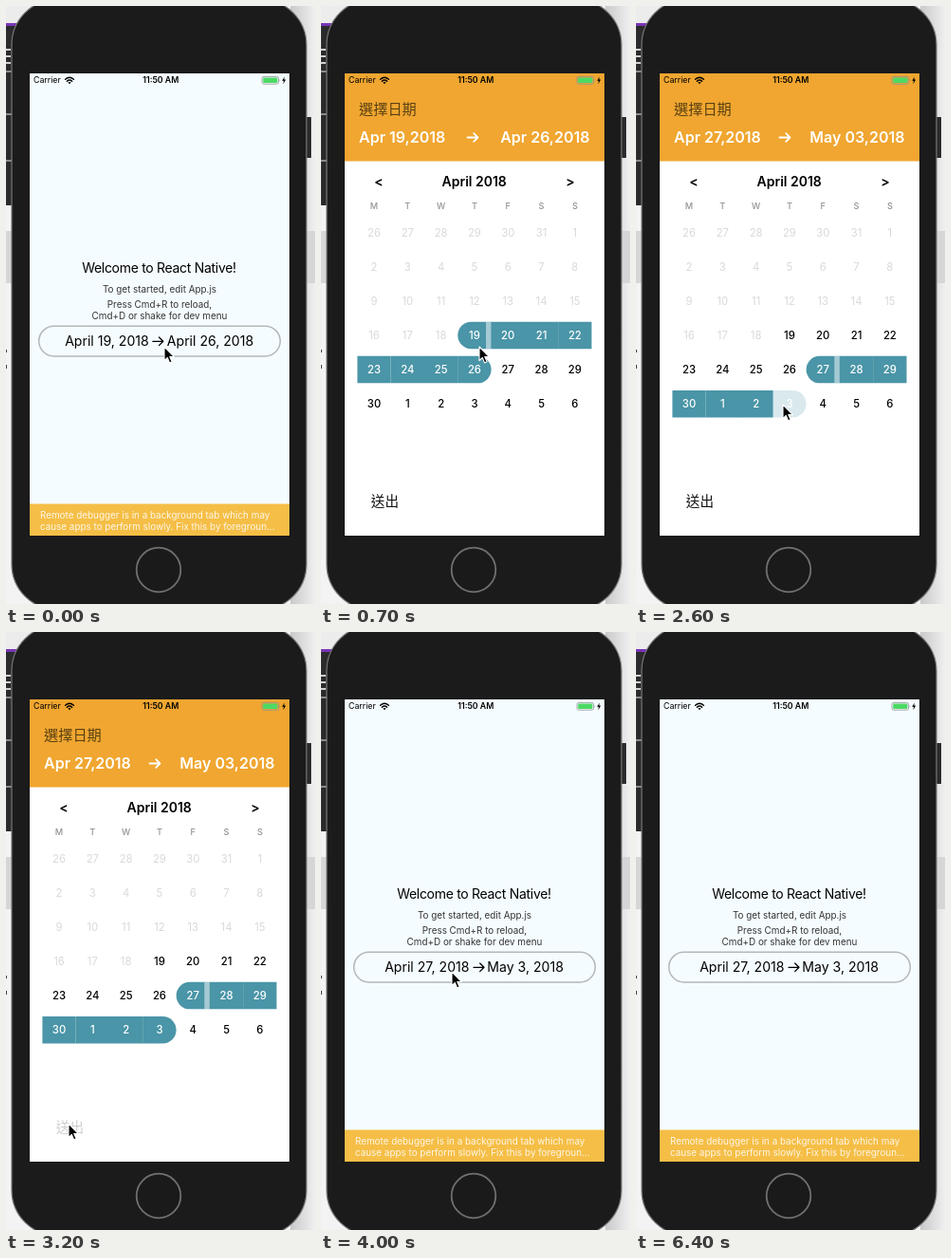
Recreate the animation shown at these times as an HTML page. Size 326 by 630 pixels, loop 6.9 s.

```html
<!DOCTYPE html>
<html lang="en">
<head>
<meta charset="utf-8">
<title>Date range picker</title>
<style>
html, body { margin: 0; width: 100%; height: 100%; overflow: hidden; background: #fff; }
svg { display: block; width: 326px; height: 630px; font-family: Inter, Roboto, sans-serif; }
.mid { text-anchor: middle; }
.end { text-anchor: end; }
.status { font-size: 8.8px; }
.note { font-size: 9.9px; fill: #333; }
.warn { font-size: 9.9px; fill: #fff; fill-opacity: .88; }
.range { font-size: 14.1px; }
.head { font-size: 16px; font-weight: 600; fill: #fff; }
.month { font-size: 14px; font-weight: 600; }
.week { font-size: 9.2px; font-weight: 500; fill: #929292; }
.day { font-size: 11.3px; font-weight: 500; }
.past { font-weight: 400; fill: #d9d9d9; }
.on { fill: #fff; }
.cjk { font-family: "Noto Sans CJK TC", "Noto Sans CJK", sans-serif; }
.line { fill: none; stroke-linecap: round; stroke-linejoin: round; }
</style>
</head>
<body>
<svg viewBox="0 0 326 630">
  <defs>
    <clipPath id="screen"><rect x="25" y="71" width="274" height="487"/></clipPath>
    <linearGradient id="shade">
      <stop offset="0" stop-color="#c9c9c9"/>
      <stop offset="1" stop-color="#efefef"/>
    </linearGradient>
    <path id="arrow" d="M-5.5 0H5.5M1.2 -4.3L5.5 0L1.2 4.3"/>
  </defs>

  <!-- desktop behind the phone -->
  <rect width="326" height="630" fill="#f3f3f3"/>
  <rect x="300" width="26" height="630" fill="url(#shade)"/>
  <rect y="237" width="326" height="55" fill="#d6d6d6"/>
  <rect width="40" height="18" fill="#ececec"/>
  <rect y="20" width="14" height="190" fill="#2b2b2d"/>
  <rect y="18" width="14" height="3" fill="#7a35b8"/>
  <path d="M0 46H5M0 53H5M0 60H5" stroke="#d0d0d0" stroke-width="2"/>
  <path d="M0 69H7M0 114H7M0 163H7" stroke="#8b8b8b" stroke-width="2"/>
  <path d="M0 362V365M0 378V382" stroke="#444" stroke-width="2"/>

  <!-- phone -->
  <path d="M2 77H7V108H2ZM1 117H7V160H1ZM1 167H7V210H1ZM316 117H322V160H316Z" fill="#2a2a2b"/>
  <rect x="6" y="-7" width="311" height="643" rx="48" fill="#1b1b1b" stroke="#777" stroke-width="1.2"/>
  <circle cx="161" cy="594" r="23.3" fill="#1a1a1a" stroke="#707070" stroke-width="1.8"/>

  <g clip-path="url(#screen)">
    <rect x="25" y="71" width="274" height="487" fill="#f5fcff"/>
    <text class="mid" x="161.5" y="281" font-size="14" letter-spacing="-.3">Welcome to React Native!</text>
    <g class="note mid">
      <text x="162" y="301.8">To get started, edit App.js</text>
      <text x="162" y="317.8">Press Cmd+R to reload,</text>
      <text x="162" y="330.3">Cmd+D or shake for dev menu</text>
    </g>
    <rect x="34.7" y="337.2" width="254.6" height="31.8" rx="15.9" fill="none" stroke="#b3b8ba" stroke-width="1.5"/>
    <g class="range">
      <text id="from" class="end" y="358.2"></text>
      <text id="to" y="358.2"></text>
      <use id="rangeArrow" href="#arrow" class="line" stroke="#000" stroke-width="1.3"/>
    </g>
    <rect x="25" y="524.5" width="274" height="34" fill="#f5be46"/>
    <g class="warn">
      <text x="36" y="539.5">Remote debugger is in a background tab which may</text>
      <text x="36" y="552">cause apps to perform slowly. Fix this by foregroun...</text>
    </g>

    <g id="sheet">
      <rect x="25" y="71" width="274" height="487" fill="#fff"/>
      <rect x="25" y="71" width="274" height="92.5" fill="#f0a630"/>
      <text class="cjk" lang="zh-Hant" x="40" y="114.2" font-size="15.2" font-weight="500" fill="#5a4112">選擇日期</text>
      <g class="head">
        <text id="start" x="40" y="144.2"></text>
        <text id="end" class="end" x="283.5" y="144.2"></text>
        <use id="headArrow" href="#arrow" class="line" stroke="#fff" stroke-width="1.8"/>
      </g>
      <g class="month mid">
        <text x="61" y="190">&lt;</text>
        <text x="161.7" y="190">April 2018</text>
        <text x="263" y="190">&gt;</text>
      </g>
      <g id="week" class="week mid"></g>
      <g id="days" class="day mid"></g>
      <text id="submit" class="cjk" lang="zh-Hant" x="52.8" y="527" font-size="14.6" fill="#111">送出</text>
    </g>

    <g class="status">
      <text x="29" y="81.3">Carrier</text>
      <text class="mid" x="163.3" y="81.3" font-weight="600">11:50 AM</text>
      <g class="line" stroke="#000" stroke-width="1.5" stroke-linecap="butt">
        <path d="M62.6 77.2Q67 73.2 71.4 77.2M64.4 79.2Q67 76.9 69.6 79.2"/>
      </g>
      <path d="M65.4 80.6Q67 79.2 68.6 80.6L67 82.3Z"/>
      <rect x="270" y="74.4" width="17.6" height="7.8" rx="2" fill="none" stroke="#8d9295" stroke-width=".8"/>
      <rect x="271.2" y="75.6" width="15.2" height="5.4" rx="1" fill="#4cd964"/>
      <path d="M288.6 76.8Q290 78.3 288.6 79.8Z" fill="#8d9295"/>
      <path d="M293.9 74.4L291.2 78.8H293L292.4 82.2L295.2 77.6H293.3Z"/>
    </g>
  </g>

  <path id="cursor" d="M0 0V14.6L3.3 11.5L5.6 16.9L8.1 15.8L5.8 10.5H10.4Z" stroke="#fff" stroke-width="1.1" stroke-linejoin="round"/>
</svg>
<script>
const LOOP = 6900, STEP = 100, HEIGHT = 487;
const LEFT = 38.4, TOP = 238.5, COL = 35.3, ROW = 36.15, CELL = 28.5;
const TEAL = '#4a95a7';
const APR19 = 24, APR26 = 31, APR27 = 32, MAY3 = 38;
const $ = id => document.getElementById(id);

// time, x, y of the pointer tip
const path = [
  [0, 167, 359], [800, 167, 359], [1200, 197, 379], [1800, 197, 379],
  [2300, 155, 420], [2600, 155, 420], [3000, 66, 518], [3600, 66, 518],
  [4000, 138, 358], [6100, 138, 358], [6300, 219, 185], [LOOP, 219, 185]
];

function pointer(t) {
  const i = path.findIndex(p => p[0] > t);
  const [t0, x0, y0] = path[i - 1], [t1, x1, y1] = path[i];
  const u = (t - t0) / (t1 - t0), k = u * u * (3 - 2 * u);
  return [x0 + (x1 - x0) * k, y0 + (y1 - y0) * k];
}

function sheetOffset(t) {
  if (t < 200 || t > 3700) return HEIGHT;
  if (t < 3300) return t > 600 ? 0 : HEIGHT * .62 * .31 ** ((t - 200) / 100);
  return HEIGHT * (1 - .304 ** ((t - 3300) / 100));
}

// a touched item dims, then fades back after release
function touch(t, down, up) {
  if (t < down || t > up + 200) return 1;
  return t <= up ? .2 : Math.min(1, .2 + (t - up) / 250);
}

function block(x, y, first, last, col) {
  const r = CELL / 2, w = COL + (last || col === 6 ? 0 : .3);
  const round = s => `A${r} ${r} 0 0 ${s} `;
  if (first) return `M${x + w} ${y}H${x + r}${round(0)}${x + r} ${y + CELL}H${x + w}Z`;
  if (last) return `M${x} ${y}H${x + w - r}${round(1)}${x + w - r} ${y + CELL}H${x}Z`;
  return `M${x} ${y}h${w}v${CELL}h${-w}Z`;
}

function dayCell(i, from, to, alpha) {
  const col = i % 7, x = LEFT + col * COL, cy = TOP + Math.floor(i / 7) * ROW, y = cy - CELL / 2;
  const num = i < 6 ? 26 + i : i < 36 ? i - 5 : i - 35;
  const on = i >= from && i <= to;
  let out = `<g opacity="${alpha}">`;
  if (on) {
    out += `<path fill="${TEAL}" d="${block(x, y, i === from, i === to, col)}"/>`;
    if (i === from && to > from) out += `<rect x="${x + COL - 5.6}" y="${y}" width="5.6" height="${CELL}" fill="#fff" opacity=".5"/>`;
    if (col === 0) out += `<rect x="${x + COL - .6}" y="${y}" width=".8" height="${CELL}" fill="#fff" opacity=".45"/>`;
  }
  const kind = on ? 'on' : i < APR19 ? 'past' : '';
  return out + `<text class="${kind}" x="${x + COL / 2}" y="${cy + 4.1}">${num}</text></g>`;
}

let lastDays = '';
function drawDays(t) {
  const from = t < 1700 ? APR19 : APR27;
  const to = t < 1700 ? APR26 : t < 2600 ? APR27 : MAY3;
  let out = '';
  for (let i = 0; i < 42; i++) {
    const alpha = i === APR27 ? touch(t, 1600, 1700) : i === MAY3 ? touch(t, 2500, 2600) : 1;
    out += dayCell(i, from, to, alpha);
  }
  if (out !== lastDays) $('days').innerHTML = lastDays = out;
}

const move = (id, x, y) => $(id).setAttribute('transform', `translate(${x} ${y})`);

function draw(t) {
  const chosen = t >= 3300, ended = t >= 2600;
  $('from').textContent = chosen ? 'April 27, 2018' : 'April 19, 2018';
  $('to').textContent = chosen ? 'May 3, 2018' : 'April 26, 2018';
  $('from').setAttribute('x', chosen ? 156.5 : 150.8);
  $('to').setAttribute('x', chosen ? 175.2 : 169.8);
  move('rangeArrow', chosen ? 166.5 : 160.3, 353.3);

  $('start').textContent = t < 1700 ? 'Apr 19,2018' : 'Apr 27,2018';
  $('end').textContent = ended ? 'May 03,2018' : 'Apr 26,2018';
  move('headArrow', ended ? 157 : 160, 138.5);
  drawDays(t);
  $('submit').setAttribute('opacity', touch(t, 3100, 3200));
  move('sheet', 0, Math.round(sheetOffset(t)));

  move('cursor', ...pointer(t));
  $('cursor').style.display = t < 6400 ? '' : 'none';
}

$('week').innerHTML = [...'MTWTFSS'].map((c, i) =>
  `<text x="${LEFT + (i + .5) * COL}" y="213.8">${c}</text>`).join('');

function tick() {
  draw(Math.floor(performance.now() / STEP) * STEP % LOOP);
  requestAnimationFrame(tick);
}
tick();
</script>
</body>
</html>
```
